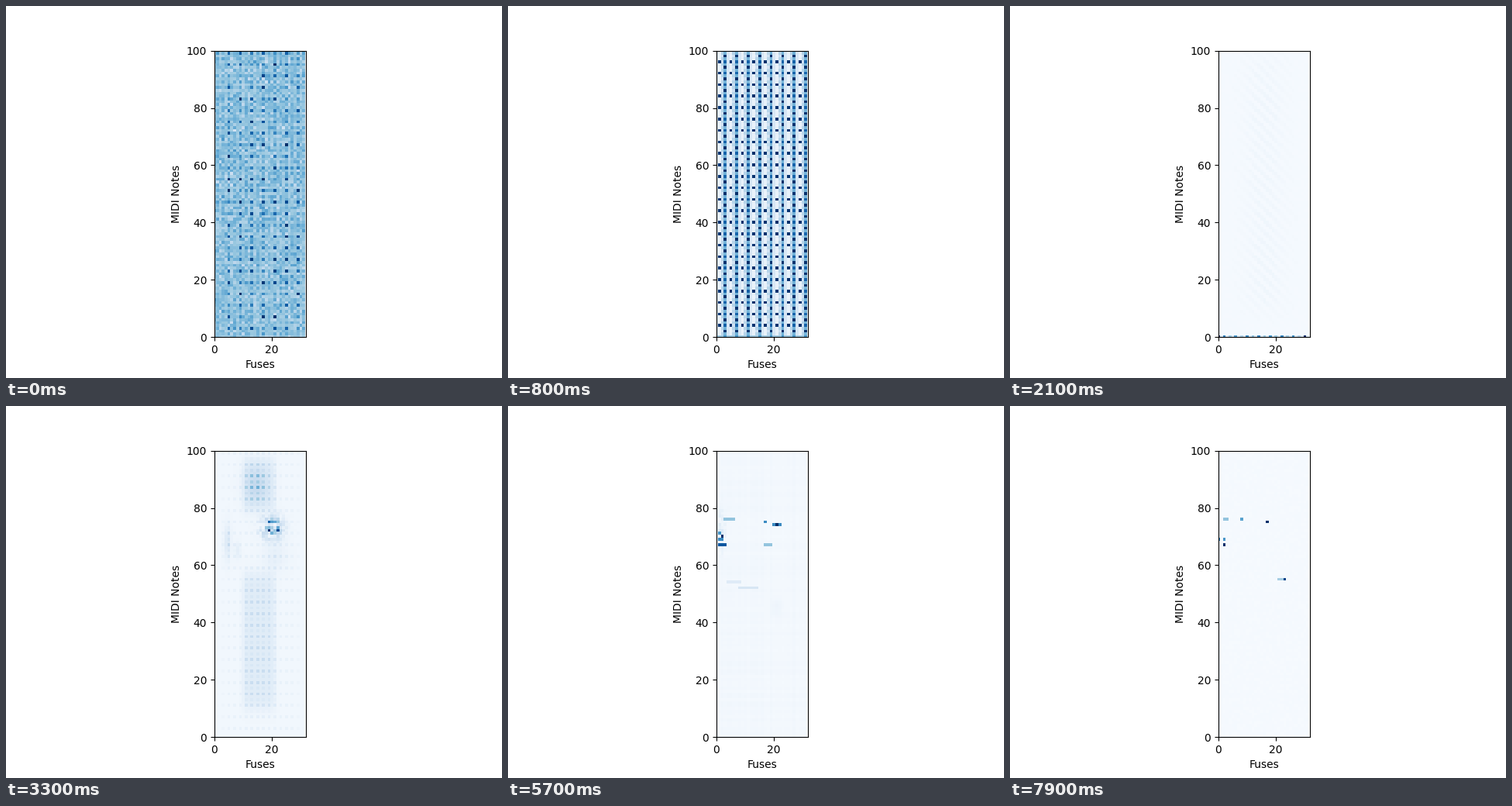
These frames come from a looping animation (640 by 480 pixels, 8 s). A matplotlib script:

```python
import matplotlib.pyplot as plt
import numpy as np
from matplotlib.animation import FuncAnimation

ROWS, COLS = 128, 32
FRAMES, STEP = 80, 100

rng = np.random.default_rng(7)
Y, X = np.mgrid[0:ROWS, 0:COLS]
ODD = (X % 2 == 1) & (Y % 2 == 1)


def blob(x, y, sx, sy):
    return np.exp(-((X - x) / sx) ** 2 - ((Y - y) / sy) ** 2)


def band(v, lo, hi, soft=1.0):
    """Soft window that is 1 between lo and hi."""
    return 1 / ((1 + np.exp((lo - v) / soft)) * (1 + np.exp((v - hi) / soft)))


def lattice(row, col):
    """Mask of the cells at one phase of the 4 x 4 upsampling grid."""
    return (Y % 4 == row) & (X % 4 == col)


def grain(lo, hi):
    return rng.uniform(lo, hi, X.shape)


def play(grid, notes):
    """Draw runs of cells given as (note, first fuse, length, level)."""
    for note, first, length, level in notes:
        grid[note, first:first + length] = level
    return grid


def static():
    g = .40 + rng.normal(0, .06, X.shape)
    g += .08 * ODD - .06 * lattice(1, 2)
    g += lattice(3, 1) * grain(.05, .5) * (X > 1)
    return np.clip(g, 0, 1)


def checks():
    g = .06 + .09 * (X % 4 == 0) + .02 * rng.random(X.shape)
    g += (X % 4 == 2) * (.12 + .1 * (Y % 2))
    g += (X % 4 == 3) * np.where(Y % 2 == 1, .4, .72)
    g += .9 * lattice(0, 1) + .18 * lattice(2, 3)
    g[0] = np.where(X[0] % 4 == 3, .6, .35)
    return np.clip(g, 0, 1)


def blank():
    g = .012 + .025 * band(X, 10, 22, 2) * band(Y, 9, 97, 2) * ((X + Y) % 4 < 2)
    g[0] = np.where(X[0] % 4 == 2, .6, np.where(X[0] % 2 == 0, .35, .12))
    g[0, [0, -2]] = .95
    return g


def clouds():
    texture = .65 + .3 * ODD + .3 * ODD * (Y % 4 == 3)
    column = band(X, 10, 21, .4) * (band(Y, 10, 57, 1.4) + band(Y, 79, 97, 1))
    g = .03 + .04 * band(X, 3, 29) * ODD * (Y % 4 == 3)
    g += texture * (.13 * column + .22 * blob(14.5, 88, 4, 6) + .08 * blob(21, 63, 4, 5))
    g += texture * (.17 * blob(4.6, 68, 1.2, 6) + .1 * blob(8, 65, 1, 3))
    g += blob(20, 73, 3.4, 3.6) * grain(0, .75)
    return play(g, [(72, 19, 1, 1), (72, 22, 1, .9), (75, 19, 1, .8)])


def dots():
    weight = np.where(X % 4 == 1, .46, np.where(X % 2 == 1, .3, .1)) * band(X, 0, 25, .5)
    weight += .1 * (X % 16 == 1)
    gap = 1 - band(Y, 59, 79, .6)
    tall = band(Y, 9, 98, .6)
    strips = .05 * band(X, 8, 23, .8) + .13 * np.isin(X, (12, 16, 20))
    melody = (blob(4.3, 76.5, 1.2, 2) + blob(4.3, 68, 1.2, 2.5)
              + blob(20.3, 75, 2, 3) + blob(22, 56, 3.2, 2.8))
    g = .015 + strips * gap * tall
    g += (Y % 4 == 1) * tall * weight * (.4 + .6 * gap) * grain(.8, 1.1)
    g += (Y % 4 == 1) * (X % 4 == 1) * .5 * band(Y, 60, 78) * (X % 16 == 1)
    g += melody * (grain(0, .65) + .4 * (Y % 4 == 1))
    return np.clip(g, 0, 1)


def sparse():
    g = .012 + .012 * rng.random(COLS) + .012 * rng.random((ROWS, 1))
    g = g + .03 * blob(21, 45, 2, 3) + .2 * blob(1.5, 72, 1.3, 6) * grain(0, 1)
    return play(g, [(76, 3, 4, .4), (75, 17, 1, .65), (74, 20, 3, .65), (74, 21, 1, 1),
                    (71, 1, 1, .62), (70, 2, 1, 1), (69, 1, 2, .65), (67, 1, 3, .85),
                    (67, 17, 3, .4), (54, 4, 5, .12), (52, 8, 7, .16)])


def final():
    g = .006 + .008 * rng.random(X.shape)
    return play(g, [(76, 2, 2, .4), (76, 8, 1, .55), (75, 17, 1, 1), (69, 0, 1, .7),
                    (69, 2, 1, .6), (67, 2, 1, 1), (55, 21, 2, .35), (55, 23, 1, .92)])


noise, grid, empty, cloud, dotted, few, last = (
    make() for make in (static, checks, blank, clouds, dots, sparse, final))
early = np.where(Y <= 75, .5 * empty + .4 * cloud, empty)

# (frame index, state); states blend linearly in between
keys = [(0, noise), (8, grid), (18, empty), (22, empty), (27, early),
        (33, cloud), (43, dotted), (57, few), (79, last)]


def grid_at(n):
    for (a, ga), (b, gb) in zip(keys, keys[1:]):
        if n <= b:
            break
    t = (n - a) / (b - a)
    jitter = np.random.default_rng(100 + n).uniform(-.25, .25, X.shape)
    g = ((1 - t) * ga + t * gb) * (1 + np.sin(np.pi * t) * jitter)
    return g / g[:101].max()


fig, ax = plt.subplots(figsize=(6.4, 4.8), dpi=100)
image = ax.imshow(grid_at(0), cmap="Blues", vmin=0, vmax=1, interpolation="nearest")
ax.set_xlim(0, 32)
ax.set_ylim(0, 100)
ax.set_xlabel("Fuses")
ax.set_ylabel("MIDI Notes")


def update(n):
    image.set_data(grid_at(n))
    return (image,)


anim = FuncAnimation(fig, update, frames=FRAMES, interval=STEP, repeat=True, repeat_delay=0)
plt.show()
```
